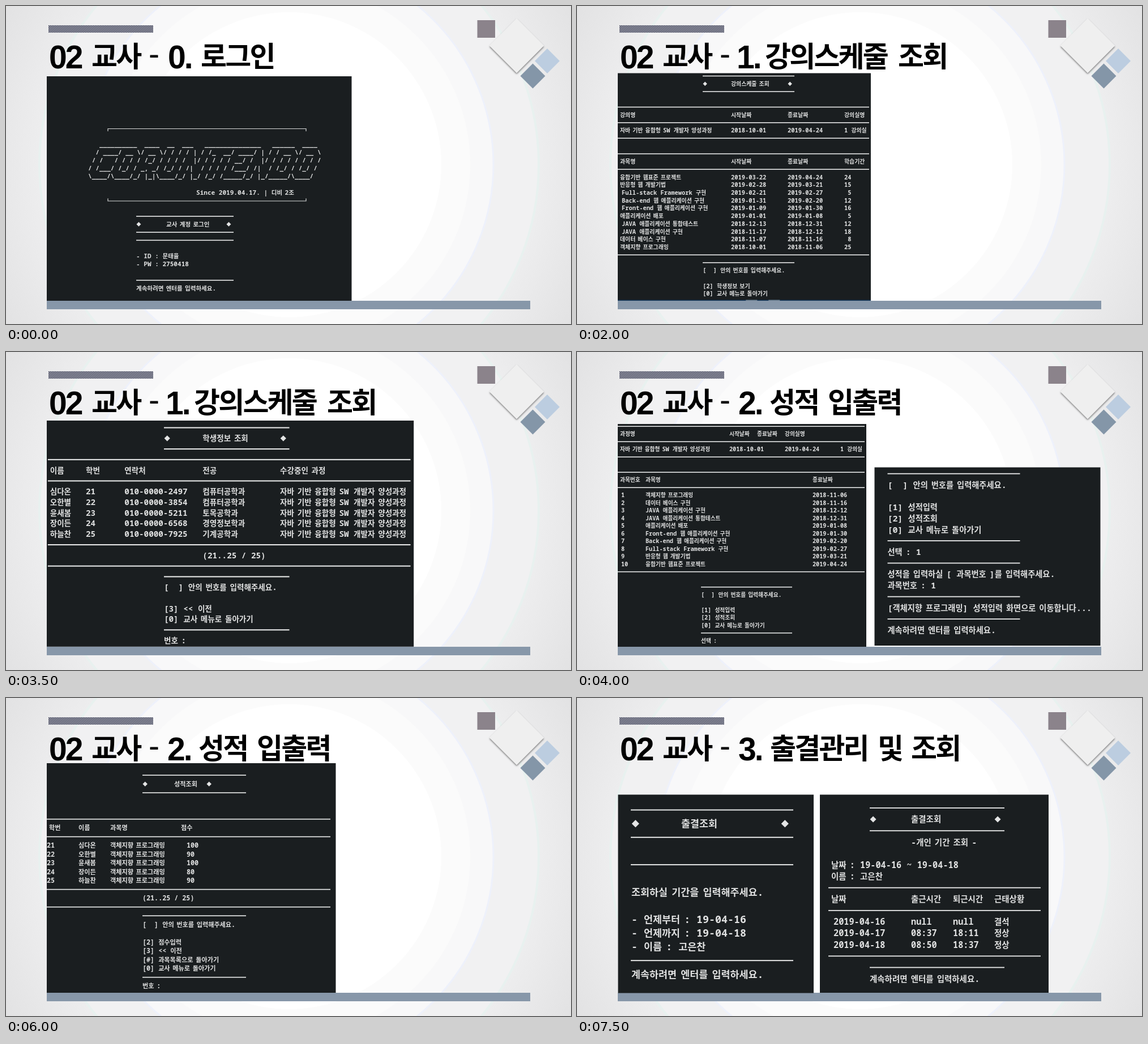
Recreate the animation shown at these times as an HTML page. Size 998 px wide and 561 px high, loop 8 s.

```html
<!DOCTYPE html>
<html lang="ko">
<head>
<meta charset="utf-8">
<style>
  html, body { margin: 0; width: 100%; height: 100%; overflow: hidden; background: #fff; }
  svg { display: block; width: 998px; height: 561px; }
  text { white-space: pre; }
  .term { font-family: "Noto Sans Mono", "DejaVu Sans Mono", monospace; font-weight: 600; fill: #e0e1e1; }
  .ko { font-family: "Noto Sans CJK KR", "Noto Sans CJK", sans-serif; font-weight: 700; font-size: .95em; word-spacing: .14em; }
  .head { font: 700 57px "Liberation Sans", sans-serif; letter-spacing: -3px; }
  .dash { font: 400 57px "Liberation Sans", sans-serif; }
  .headKo { font: 900 50px "Noto Sans CJK KR", "Noto Sans CJK", sans-serif; letter-spacing: -2.8px; }
</style>
</head>
<body>
<svg id="stage" viewBox="0 0 998 561" xml:space="preserve">
  <defs>
    <radialGradient id="edge" gradientUnits="userSpaceOnUse" cx="500" cy="280" r="575">
      <stop offset=".77" stop-color="#ededee"/>
      <stop offset="1" stop-color="#e2e2e3"/>
    </radialGradient>
    <pattern id="hatch" width="2.15" height="2.15" patternUnits="userSpaceOnUse" patternTransform="rotate(45)">
      <rect width="2.15" height="2.15" fill="#c9cad2"/>
      <rect width="1.25" height="2.15" fill="#3c3f55"/>
    </pattern>
    <filter id="shade" x="-20%" y="-20%" width="140%" height="140%">
      <feDropShadow dx="0" dy="2" stdDeviation="1.5" flood-color="#000" flood-opacity=".5"/>
    </filter>
  </defs>
  <rect width="998" height="561" fill="url(#edge)"/>
  <circle cx="500" cy="280" r="441" fill="#f1f1f2" stroke="#e8f1ef" stroke-width="4"/>
  <circle cx="500" cy="280" r="361" fill="#f8f8f9" stroke="#eef1fb" stroke-width="3"/>
  <circle cx="500" cy="280" r="320" fill="#fbfbfb"/>
  <circle cx="500" cy="280" r="269" fill="#fff"/>
  <rect x="75" y="34" width="185" height="13" fill="url(#hatch)"/>
  <rect x="832.5" y="25" width="31.5" height="31" fill="#8b838b"/>
  <path d="M902 22l48 48-48 48-48-48z" fill="#efefef" filter="url(#shade)"/>
  <path d="M956 75l22 22-22 22-22-22z" fill="#bccde0"/>
  <path d="M930.5 101.5l22 22-22 22-22-22z" fill="#8496a8"/>
  <rect x="72" y="520" width="854" height="15" fill="#8797a9"/>
</svg>
<script>
const stage = document.getElementById('stage');

function add(parent, tag, attrs, text) {
  const node = document.createElementNS('http://www.w3.org/2000/svg', tag);
  for (const k in attrs) node.setAttribute(k, attrs[k]);
  if (text) node.textContent = text;
  return parent.appendChild(node);
}

function drawCell(g, x, y, size, text) {
  if (text === '◆') {
    const r = size * .36;
    add(g, 'path', { d: `M${x + size * .4} ${y - r}l${r} ${r}-${r} ${r}-${r}-${r}z`, fill: '#e4e5e5' });
    return;
  }
  const line = add(g, 'text', { x, y: y + size * .35, 'font-size': size, class: 'term' });
  text.split(/([가-힣][가-힣 ]*)/).forEach((part, i) => {
    if (part) add(line, 'tspan', i % 2 ? { class: 'ko' } : {}, part);
  });
}

// Rows: "=" and "~" are rules, ";" parts cells, "@x " places a cell.
function drawPanel(slide, p) {
  const [x, y, w, h] = p.box, { size, y0, pitch } = p;
  const g = add(slide, 'g', {});
  if (p.fit) {
    const [fx, fy, s] = p.fit;
    g.setAttribute('transform', `translate(${fx - s * x} ${fy - s * y}) scale(${s})`);
  }
  add(g, 'rect', { x, y, width: w, height: h, fill: '#1a1e20' });
  if (p.strip) {
    const bar = (dx, width, fill) => add(g, 'rect', { x: x + dx, y: y + h - 1.5, width, height: 1.5, fill });
    bar(0, w, '#173a5e');
    for (const k of [21.75, 25.6]) bar(k * size, 1.93 * size, '#6f8191');
  }
  const weight = size * .05 + 1.1;
  p.rows.forEach((row, n) => {
    const cy = y0 + n * pitch;
    if (row === '=' || row === '~') {
      const [a, b] = p.rules[row === '=' ? 0 : 1];
      add(g, 'rect', { x: a, y: cy - weight / 2, width: b - a, height: weight, fill: '#e4e5e5' });
      return;
    }
    row.split(';').forEach((cell, i) => {
      const m = cell.match(/^@(\d+) (.*)$/);
      const text = m ? m[2] : cell;
      if (text) drawCell(g, m ? +m[1] : p.cols[i], cy, size, text);
    });
  });
  if (p.frame) add(g, 'path', { d: p.frame, fill: 'none', stroke: '#d8d9d9', 'stroke-width': 1.2 });
}

const names = ('고은찬 남시우 노해랑 도윤슬 류가람 문보라 서한결 석나래 유진솔 차아름 ' +
  '변가온 봉하람 표도담 추예솔 여름찬 온새론 탁라온 피다솜 길마루 편아라 ' +
  '심다온 오한별 윤새봄 장이든 하늘찬').split(' ');
const majors = '컴퓨터 컴퓨터 토목 경영정보 기계 경영정보 영어영문 한국어 컴퓨터 중어중문'.split(' ')
  .map(m => m + (/컴퓨터|토목|기계/.test(m) ? '공학과' : '학과'));
const course = '자바 기반 융합형 SW 개발자 양성과정';
const ask = '[  ] 안의 번호를 입력해주세요.';
const enter = '계속하려면 엔터를 입력하세요.';
const back = '[0] 교사 메뉴로 돌아가기';
const range = (a, b) => Array.from({ length: b - a + 1 }, (_, i) => a + i);

// name, first day, last day, days
const subjects = [
  ['객체지향 프로그래밍', '2018-10-01', '2018-11-06', '25'],
  ['데이터 베이스 구현', '2018-11-07', '2018-11-16', ' 8'],
  ['JAVA 애플리케이션 구현', '2018-11-17', '2018-12-12', '18'],
  ['JAVA 애플리케이션 통합테스트', '2018-12-13', '2018-12-31', '12'],
  ['애플리케이션 배포', '2019-01-01', '2019-01-08', ' 5'],
  ['Front-end 웹 애플리케이션 구현', '2019-01-09', '2019-01-30', '16'],
  ['Back-end 웹 애플리케이션 구현', '2019-01-31', '2019-02-20', '12'],
  ['Full-stack Framework 구현', '2019-02-21', '2019-02-27', ' 5'],
  ['반응형 웹 개발기법', '2019-02-28', '2019-03-21', '15'],
  ['융합기반 웹표준 프로젝트', '2019-03-22', '2019-04-24', '24']
];

const logo = [
  String.raw`   __________  ____  __  ___   _______________   ______  ____`,
  String.raw`  / ____/ __ \/ __ \/ / / / | / /_  __/ ____/ | / / __ \/ __ \ `,
  String.raw` / /   / / / / /_/ / / / /  |/ / / / / __/ /  |/ / / / / / / /`,
  String.raw`/ /___/ /_/ / _, _/ /_/ / /|  / / / / /___/ /|  / /_/ / /_/ /`,
  String.raw`\____/\____/_/ |_|\____/_/ |_/ /_/ /_____/_/ |_/_____/\____/`
].map(s => '@145 ' + s);

const account = ['- ID : 문태율', '- PW : 2750418'];
const login = {
  box: [72, 124, 538.5, 396], size: 11.07, y0: 215.9, pitch: 14.1, cols: [230], rules: [[230, 402]],
  frame: 'M180 221v-4.5h350v4.5M180 339.5v4.5h350v-4.5',
  rows: ['', '', ...logo, '', '@336 Since 2019.04.17. | 디비 2조', '', '', '=',
    '◆;@283 교사 계정 로그인;@389 ◆', '=', '=', '', ...account, '', '=', enter]
};
const welcome = {
  box: [72, 150, 600, 370], size: 20, y0: 184, pitch: 26.5, cols: [122], rules: [[121, 433]],
  rows: ['=', '◆;@217 교사 계정 로그인;@411 ◆', '=', '=', '', ...account, '', '=',
    '로그인에 성공했습니다.', '교사 메뉴 화면으로 이동합니다...', '=', enter]
};

const menu = (pick = '', fit) => ({
  box: [72.5, 144, 421, 376], size: 22.4, y0: 180.5, pitch: 29.6, cols: [106], rules: [[105, 455]], fit,
  rows: ['=', '◆;@213 교사 메뉴;@429 ◆', '=', '=', '[1] 강의스케줄 조회', '[2] 성적 입출력',
    '[3] 출결관리 및 조회', '[4] 교사평가 조회', '[5] 상담일지 조회', '[0] 초기화면', '=', '선택 : ' + pick]
});

const side = (box, y0, rows) => ({
  box, size: 15, y0, pitch: 19.72, cols: [box[0] + 23], rules: [[box[0] + 23, box[0] + 257]], rows
});

const scheduleRows = [
  '~', '@222 ◆;@272 강의스케줄 조회;@372 ◆', '~', '', '=', '강의명;시작날짜;종료날짜;강의실명', '=',
  course + ';2018-10-01;2019-04-24;1 강의실', '=', '', '=', '과목명;시작날짜;종료날짜;학습기간', '=',
  ...[...subjects].reverse().map(s => (/^[A-Z]/.test(s[0]) ? '@79 ' : '') + s.join(';')),
  '=', '~', '@222 ' + ask, '', '@222 [2] 학생정보 보기', '@222 ' + back
];
const schedule = {
  box: [72, 118.5, 447, 401.5], size: 10.4, y0: 123.5, pitch: 13.72, strip: true,
  cols: [76, 272, 372, 472], rules: [[72, 516], [222, 384]], rows: scheduleRows
};
const scheduleEnd = {
  ...schedule, box: [72, 118.5, 447, 352], fit: [72, 128.6, 1.112],
  rows: [...scheduleRows.slice(6), '~', '@222 번호 : 2']
};

const students = (a, b, more) => ({
  box: [72.5, 121, 512, 399], size: 11.28, y0: 140.9, pitch: 14.83,
  cols: [77, 127, 181, 290, 398], rules: [[74, 580], [236, 411]],
  rows: ['~', '@236 ◆;@290 학생정보 조회;@398 ◆', '~', '=', '이름;학번;연락처;전공;수강중인 과정', '=',
    ...range(a, b).map(i =>
      [names[i - 1], i, '010-0000-' + (1000 + i * 1357 % 9000), majors[(i - 1) % 10], course].join(';')),
    '=', `@290 (${a}..${b} / 25)`, '=', '~', '@236 ' + ask, '', '@236 ' + more, '@236 ' + back, '~', '@236 번호 :']
});

const gradeLists = {
  box: [72, 127, 439, 393], size: 10.2, y0: 131.2, pitch: 13.5,
  cols: [78, 121, 416], rules: [[72, 508], [219, 380]],
  rows: ['=', '@76 과정명;@269 시작날짜;@318 종료날짜;@367 강의실명', '=',
    `@76 ${course};@269 2018-10-01;@367 2019-04-24;@465 1 강의실`, '=', '', '=',
    '@76 과목번호;과목명;종료날짜', '=', ...subjects.map((s, i) => [i + 1, s[0], s[2]].join(';')),
    '=', '', '~', '@219 ' + ask, '', '@219 [1] 성적입력', '@219 [2] 성적조회', '@219 ' + back, '~', '@219 선택 :']
};
const gradePick = side([525.5, 203.5, 399, 314.5], 214.7, ['=', ask, '', '[1] 성적입력', '[2] 성적조회', back, '=',
  '선택 : 1', '=', '성적을 입력하실 [ 과목번호 ]를 입력해주세요.', '과목번호 : 1', '=',
  '[객체지향 프로그래밍] 성적입력 화면으로 이동합니다...', '=', enter]);

const scores = [100, 90, 100, 80, 90];
const grades = (title, a, b, w, move, blank) => ({
  box: [72, 115, w, 405 + 15.5 * (b - a - 4)], size: 11.73, y0: 136.2, pitch: 15.5,
  cols: [72, 128, 184, 319], rules: [[72, 573], [241, 424]], fit: b - a > 4 ? [72, 116, .837] : null,
  rows: ['~', `@241 ◆;@297 ${title};@354 ◆`, '~', '', '', '=', '@76 학번;이름;과목명;@309 점수', '=',
    ...range(a, b).map(i => [i, names[i - 1], subjects[0][0], blank ? 'null' : scores[(i - 1) % 5]].join(';')),
    '=', `@241 (${a}..${b} / 25)`, '=', '~', '@241 ' + ask, '', '@241 [2] 점수입력', '@241 ' + move,
    '@241 [#] 과목목록으로 돌아가기', '@241 ' + back, '~', '@241 번호 :']
});

const attendMenu = side([505, 207, 350, 316], 224, ['=', '◆;@580 출결관리 및 조회;@744 ◆', '=', '', ask, '',
  '[1] 전체 출결 조회', '[2] 개인 기간 조회', back, '=', '선택 : 2', '=', '출결조회 화면으로 이동합니다...', '=', enter]);
const attendAll = {
  box: [72, 125, 560, 395], size: 14, y0: 146, pitch: 19.6,
  cols: [88, 210, 320, 420, 520], rules: [[80, 620], [210, 428]],
  rows: ['~', '@210 ◆;@285 출결조회;@415 ◆', '~', '', '=', '날짜;이름;출근시간;퇴근시간;근태상황', '=',
    ...range(1, 7).map(i => ['2019-04-18', names[i - 1], '08:' + (33 + i * 17 % 24), '18:' + (10 + i * 13 % 30), '정상'].join(';')),
    '=', '@285 (1..7 / 25)', '=', '~', '@210 ' + enter]
};
const attendAsk = {
  box: [72.5, 170.5, 345.5, 350], size: 18.3, y0: 197.5, pitch: 24.15, cols: [96], rules: [[95, 382]],
  rows: ['=', '◆;@184 출결조회;@360 ◆', '=', '', '=', '', '조회하실 기간을 입력해주세요.', '',
    '- 언제부터 : 19-04-16', '- 언제까지 : 19-04-18', '- 이름 : ' + names[0], '=', enter]
};
const attendOne = {
  box: [429, 170.5, 404, 349.5], size: 15.25, y0: 194, pitch: 20.1,
  cols: [453, 590, 664, 737], rules: [[444, 819], [517, 755]],
  rows: ['~', '@517 ◆;@590 출결조회;@737 ◆', '~', '@590 -개인 기간 조회 -', '',
    '@449 날짜 : 19-04-16 ~ 19-04-18', '@449 이름 : ' + names[0], '=',
    '@449 날짜;출근시간;퇴근시간;근태상황', '=', '2019-04-16;null;null;결석', '2019-04-17;08:37;18:11;정상',
    '2019-04-18;08:50;18:37;정상', '=', '~', '@517 ' + enter]
};

const titles = {
  login: [[286, '0.'], [344, '로그인']],
  menu: [[286, '0.'], [344, '교사'], [446, '메뉴']],
  plan: [[282, '1.'], [332, '강의스케줄'], [567, '조회']],
  grade: [[285, '2.'], [340, '성적'], [443, '입출력']],
  attend: [[285, '3.'], [341, '출결관리'], [531, '및'], [590, '조회']]
};

const lastPage = { ...students(21, 25, '[3] << 이전'), box: [72.5, 131, 512, 315], fit: [72, 121, 1.266] };
const planPick = side([505, 203.5, 400, 316.5], 222, ['=', '◆;@578 강의스케줄 조회;@744 ◆', '=', '',
  '[1] ' + course, '', '=', ask, '', back, '=', '선택 : 1', '=', '강의스케줄 화면으로 이동합니다...', enter]);

function drawTitle(g, title) {
  for (const [x, word] of [[76, '02'], [151, '교사'], [252, '-'], ...titles[title]]) {
    if (/[가-힣]/.test(word)) add(g, 'text', { x, y: 107, class: 'headKo' }, word);
    else if (word === '-') add(g, 'text', { x, y: 104, class: 'dash' }, word);
    else add(g, 'text', { x, y: 110, class: 'head' }, word);
  }
}

const slides = [
  ['login', login],
  ['login', welcome],
  ['menu', menu()],
  ['plan', menu('1', [70, 144, 1]), planPick],
  ['plan', schedule],
  ['plan', scheduleEnd],
  ['plan', { ...students(1, 10, '[1] 더보기'), strip: true }],
  ['plan', lastPage],
  ['grade', gradeLists, gradePick],
  ['grade', grades('성적입력', 1, 10, 591, '[1] 더보기', true)],
  ['grade', grades('성적조회', 1, 10, 585, '[1] 더보기')],
  ['grade', grades('성적조회', 11, 20, 585, '[1] 더보기')],
  ['grade', grades('성적조회', 21, 25, 510.5, '[3] << 이전')],
  ['attend', menu('3', [72, 147, 1]), attendMenu],
  ['attend', attendAll],
  ['attend', attendAsk, attendOne]
].map(([title, ...panels]) => {
  const g = add(stage, 'g', { display: 'none' });
  drawTitle(g, title);
  panels.forEach(p => drawPanel(g, p));
  return g;
});

const STEP = 500;
const start = performance.now();
let shown = -1;
function tick() {
  const now = Math.floor(Math.max(0, performance.now() - start) / STEP) % slides.length;
  if (now !== shown) {
    if (shown >= 0) slides[shown].setAttribute('display', 'none');
    slides[now].removeAttribute('display');
    shown = now;
  }
  requestAnimationFrame(tick);
}
tick();
</script>
</body>
</html>
```
